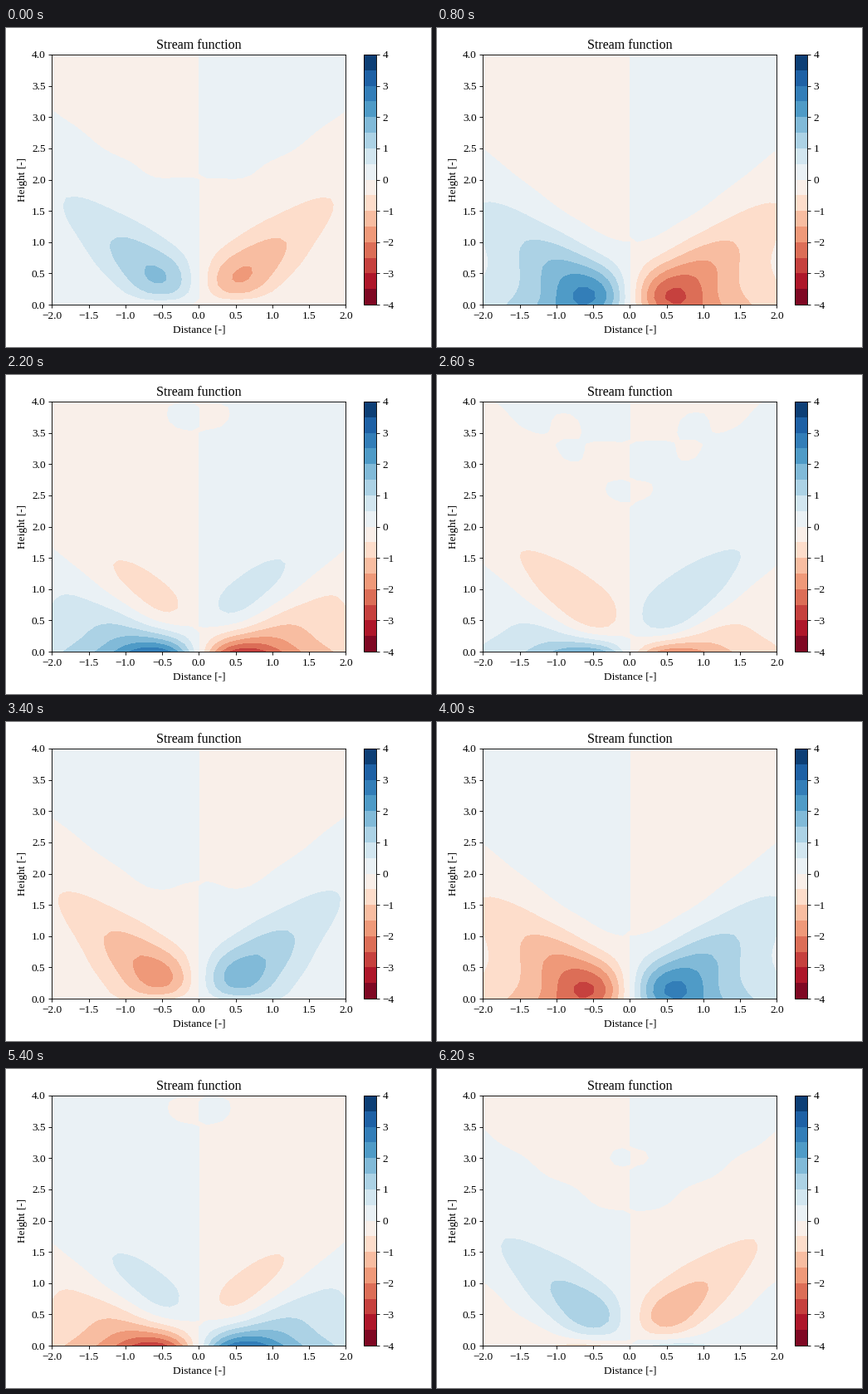
These frames come from a looping animation (512 px wide and 384 px high, 6.4 s). A matplotlib script:

```python
import matplotlib.pyplot as plt
import numpy as np
from matplotlib.animation import FuncAnimation

WIDTH, HEIGHT, DPI = 512, 384, 80
FRAMES, INTERVAL = 32, 200
HALF_WIDTH = 1.06   # horizontal scale of the forcing
K_MAX = 5.35        # largest wavenumber in the spectrum
AMPLITUDE = 6.0
LEVELS = np.linspace(-4, 4, 17)

plt.rcParams.update({"font.family": "Liberation Serif", "font.size": 12})

x = np.linspace(-2, 2, 41)
z = np.linspace(0, 4, 41)
X, Z = np.meshgrid(x, z)


def ray(s):
    """Integral of k exp(-k c) from 0 to K_MAX along a characteristic."""
    c = HALF_WIDTH - 1j * s
    return (1 - np.exp(-K_MAX * c) * (1 + K_MAX * c)) / c ** 2


wave = 0.5 * AMPLITUDE * np.exp(-Z) * (ray(Z + X) - ray(Z - X))


def pixel_axes(left, top, width, height):
    return fig.add_axes([left / WIDTH, 1 - (top + height) / HEIGHT,
                         width / WIDTH, height / HEIGHT])


def draw_field(frame):
    phase = 2 * np.pi * frame / FRAMES
    psi = np.real(wave * np.exp(1j * phase))
    return ax.contourf(X, Z, psi, levels=LEVELS, cmap="RdBu")


def update(frame):
    for old in list(ax.collections):
        old.remove()
    draw_field(frame)
    return []


fig = plt.figure(figsize=(WIDTH / DPI, HEIGHT / DPI), dpi=DPI)
ax = pixel_axes(55.35, 32, 353.9, 301)
cax = pixel_axes(430.9, 32, 15.05, 301)

fig.colorbar(draw_field(0), cax=cax, ticks=range(-4, 5))
ax.set(xlim=(-2, 2), ylim=(0, 4), title="Stream function",
       xlabel="Distance [-]", ylabel="Height [-]",
       xticks=np.arange(-2, 2.1, 0.5), yticks=np.arange(0, 4.1, 0.5))

anim = FuncAnimation(fig, update, frames=FRAMES, interval=INTERVAL,
                     repeat=True, repeat_delay=0, blit=False)
plt.show()
```
